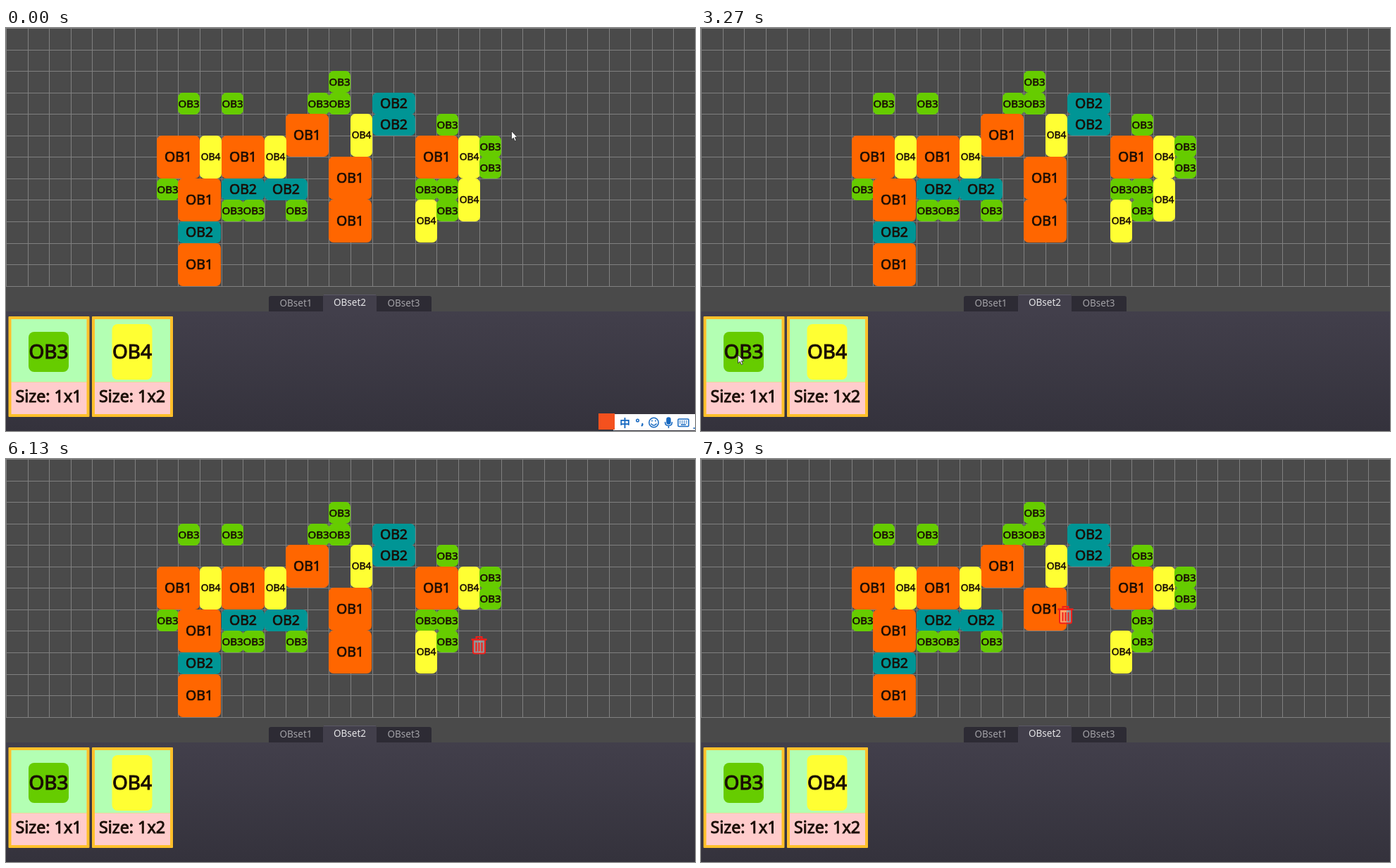
Animation, 978 px wide and 573 px high, one loop 8 s. Source, as an HTML page:

```html
<!DOCTYPE html>
<html lang="en">
<head>
<meta charset="utf-8">
<title>Block editor</title>
<style>
  html, body { margin: 0; width: 100%; height: 100%; overflow: hidden; background: #4a4a4a; }
  svg { display: block; width: 978px; height: 573px; }
  text { font-family: "Noto Sans", "Open Sans", sans-serif; text-anchor: middle; }
  .label { fill: #1a0d05; stroke: #1a0d05; stroke-width: .038em; }
  .cjk { font-family: "Noto Sans CJK SC", "Noto Sans CJK", sans-serif; }
</style>
</head>
<body>
<svg viewBox="0 0 978 573">
  <defs>
    <linearGradient id="panelFill" x1="0" y1="0" x2="0" y2="1">
      <stop offset="0" stop-color="#423f4b"/>
      <stop offset="1" stop-color="#34323c"/>
    </linearGradient>
  </defs>
  <rect width="978" height="573" fill="#4a4a4a"/>
  <path id="grid" fill="none" stroke="#808080"/>
  <g id="blocks"></g>

  <g font-size="13.5">
    <path d="M373 404V384q0-3 3-3H450V404zM526 404V381H601q3 0 3 3V404z" fill="#2d2b34"/>
    <rect y="403" width="978" height="170" fill="url(#panelFill)"/>
    <path d="M450 405V382q0-3 3-3H523q3 0 3 3V405z" fill="#423f4b"/>
    <path d="M451 379.5H525" stroke="#5b5865"/>
    <text x="411.5" y="396" fill="#a2a1a6">OBset1</text>
    <text x="488" y="395" fill="#e4e4e6">OBset2</text>
    <text x="564.5" y="396" fill="#a2a1a6">OBset3</text>
  </g>
  <g id="cards"></g>

  <g id="inputBar" fill="none" stroke="#1668c0" stroke-width="1.5">
    <rect x="862" y="549" width="116" height="23" fill="#fff" stroke="none"/>
    <rect x="841" y="548" width="23" height="23" fill="#f4511e" stroke="none"/>
    <text class="cjk" x="878.5" y="567" font-size="15" font-weight="700" fill="#1668c0" stroke="none">中</text>
    <circle cx="896.5" cy="558" r="1.8"/>
    <path d="M903 562q1.5 2-1 4" stroke-width="2"/>
    <circle cx="919.5" cy="561" r="6.7"/>
    <path d="M915.5 562.5q4 5 8 0M917 557.5v2M922 557.5v2"/>
    <rect x="938" y="554" width="5" height="9" rx="2.5" fill="#1668c0"/>
    <path d="M935.5 560q0 5.5 5 5.5t5-5.5M940.5 565.5V569"/>
    <rect x="954" y="556" width="15" height="10.5" rx="1"/>
    <path d="M956 559H967M956 561.5H967" stroke-dasharray="1.5 1.5"/>
    <path d="M958 564H965M975.5 569H978"/>
  </g>

  <g id="held"></g>
  <path id="arrow" d="M.5 .5V12.7L3.3 10.2L5.3 14.7L7.3 13.8L5.4 9.4H8.9Z"
        fill="#fff" stroke="#222" stroke-width=".8"/>
  <g id="bin" fill="none" stroke="#f01f1a" stroke-width="2">
    <path d="M3 6V22.5q0 2 2 2H18q2 0 2-2V6" fill="#fff" fill-opacity=".4"/>
    <path d="M7.5 9V21.500M11.500 9V21.500M15.500 9V21.500"/>
    <path d="M.5 4.700H22.500" stroke-width="2.600"/>
    <path d="M7.500 4V1H15.500V4"/>
  </g>
</svg>
<script>
const $ = id => document.getElementById(id);
const CELL = 30.56, LOOP = 8000, TICK = 1000 / 15;
const snap = n => Math.round(n * CELL);

const kinds = {
  1: { w: 2, h: 2, fill: '#ff6600', size: 19.5 },
  2: { w: 2, h: 1, fill: '#009595', size: 19.5 },
  3: { w: 1, h: 1, fill: '#66cc00', size: 15 },
  4: { w: 1, h: 2, fill: '#ffff33', size: 13.8 }
};
// Each digit is a block kind at its top left cell.
const LEFT = 7, TOP = 2;
const map = [
  '........3',
  '.3.3...33.2',
  '......1..42..3',
  '1.41.4......1.43',
  '........1......3',
  '31.2.2......334',
  '...33.3.1...43',
  '.2',
  '.1'
];

// Pointer moves: first tick, last tick, goal. It rests in between.
const home = [717, 146];
const moves = [
  [0, 4, 675, 4], [12, 15, 670, 25], [16, 24, 738, 11], [25, 37, 218, 481],
  [37, 45, 46, 458], [48, 49, 52, 464], [49, 53, 616, 317], [54, 60, 672, 297],
  [66, 73, 695, 275], [81, 88, 660, 252], [93, 98, 590, 302], [98, 103, 510, 261],
  [105, 111, 594, 232], [113, 119, 506, 209]
];
const HIDE = 16, RETURN = 25, GRAB = 50, ERASE = 78;
const clicks = [92, 105, 113];

function pointer(tick) {
  let [x, y] = home;
  for (const [from, to, gx, gy] of moves) {
    const u = Math.min(1, Math.max(0, (tick - from) / (to - from)));
    const e = u * u * (3 - 2 * u);
    x += (gx - x) * e;
    y += (gy - y) * e;
  }
  return [x, y];
}

const box = (x, y, w, h, r, fill) =>
  `<rect x="${x}" y="${y}" width="${w}" height="${h}" rx="${r}" fill="${fill}"/>`;
const label = (x, y, size, str) =>
  `<text class="label" x="${x}" y="${y + size * .357}" font-size="${size}">${str}</text>`;

function block(kind, x, y) {
  const k = kinds[kind], w = snap(k.w), h = snap(k.h);
  return box(x, y, w, h, 7, k.fill) + label(x + w / 2, y + h / 2, k.size, 'OB' + kind);
}

function card(x, kind, h) {
  const k = kinds[kind];
  return box(x, 410, 115, 143, 1, '#ffc02a') + box(x + 4, 414, 107, 89.5, 0, '#b3ffb3') +
    box(x + 4, 503.5, 107, 45.5, 0, '#ffcccc') +
    box(x + 28.5, 460.5 - h / 2, 57, h, 8, k.fill) +
    label(x + 57, 460.5, 28, 'OB' + kind) + label(x + 57, 524, 23.3, `Size: ${k.w}x${k.h}`);
}

// The first click whose pointer lies inside the block removes it.
function removedAt(kind, x, y) {
  const { w, h } = kinds[kind];
  return clicks.find(tick => {
    const [px, py] = pointer(tick);
    return px > x && px < x + w * CELL && py > y && py < y + h * CELL;
  }) ?? Infinity;
}

function build() {
  let d = '';
  for (let i = 0; i < 32; i++) d += `M${snap(i) + .5} 0V367`;
  for (let i = 0; i < 13; i++) d += `M0 ${snap(i) + .5}H978`;
  $('grid').setAttribute('d', d);

  let html = '';
  map.forEach((line, row) => [...line].forEach((kind, col) => {
    if (kind === '.') return;
    const x = snap(LEFT + col), y = snap(TOP + row);
    html += `<g data-end="${removedAt(kind, x, y)}">${block(kind, x, y)}</g>`;
  }));
  $('blocks').innerHTML = html;
  $('cards').innerHTML = card(3.5, 3, 57) + card(122, 4, 79);
  $('held').innerHTML = block(3, -4.5, -5.5);
}

function show(el, on) { el.style.display = on ? '' : 'none'; }

function draw(ms) {
  const tick = Math.floor((ms % LOOP + 4) / TICK) % 120;
  const move = `translate(${pointer(tick)})`;
  for (const id of ['held', 'arrow', 'bin']) $(id).setAttribute('transform', move);
  show($('held'), tick >= GRAB && tick < ERASE);
  show($('arrow'), tick < HIDE || (tick >= RETURN && tick < ERASE));
  show($('bin'), tick >= ERASE);
  show($('inputBar'), tick < 20);
  for (const g of $('blocks').children) show(g, tick < +g.dataset.end);
}

build();
let start;
function loop(now) {
  start ??= now;
  draw(now - start);
  requestAnimationFrame(loop);
}
draw(0);
requestAnimationFrame(loop);
</script>
</body>
</html>
```
